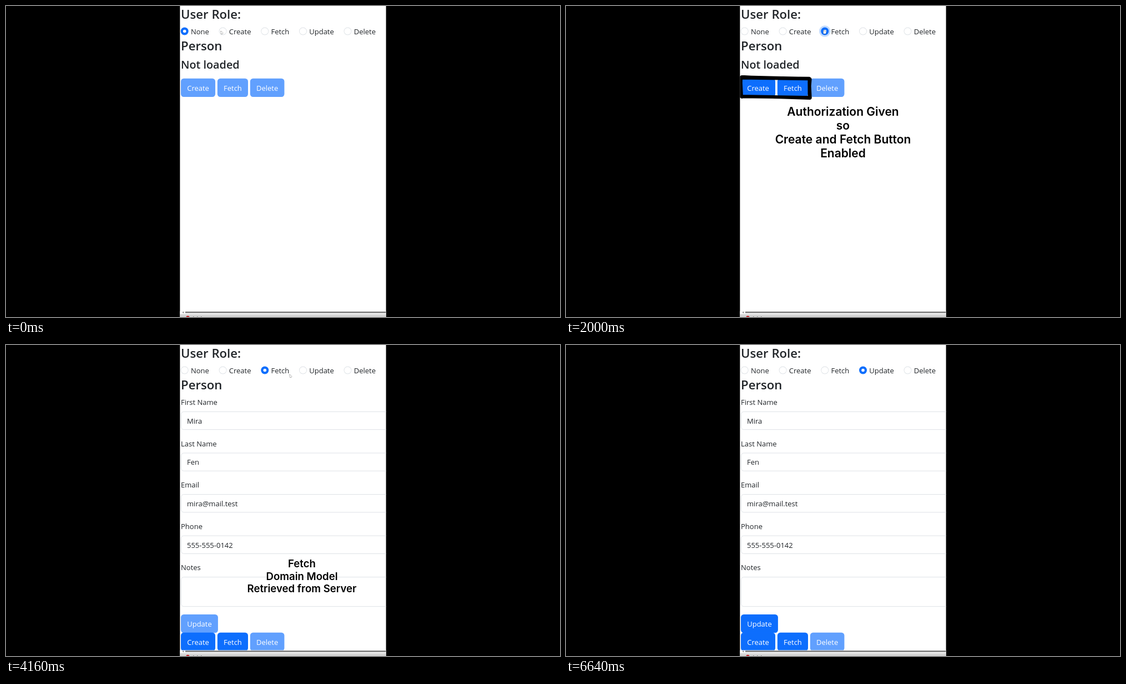
These frames come from a looping animation (998 by 561 pixels, 6.72 s). An HTML page with a canvas:

```html
<!DOCTYPE html>
<html lang="en">
<head>
<meta charset="utf-8">
<title>Role based form</title>
<style>
html, body { margin: 0; width: 100%; height: 100%; overflow: hidden; background: #000; }
canvas { display: block; }
</style>
</head>
<body>
<canvas id="stage" width="998" height="561"></canvas>
<script>
const ctx = document.getElementById('stage').getContext('2d');
const LOOP = 6720, STEP = 80;
const LOAD = 3200;                      // the form arrives
const CHECKS = [400, 1680, 4960];       // Create, Fetch, Update get checked
const LEFT = 315, RADIO_Y = 45.5, FIELD_STEP = 74.6;
const BLUE = '#0d6efd', HOVER = '#0b5ed7', INK = '#212529', LINE = '#dee2e6';
const UI = '"Open Sans", "Noto Sans", sans-serif';
const CAPTION = 'Inter, sans-serif';

const roles = ['None', 'Create', 'Fetch', 'Update', 'Delete'];
const fields = { 'First Name': 'Mira', 'Last Name': 'Fen', Email: 'mira@mail.test', Phone: '555-555-0142', Notes: '' };

const captions = [
  { from: 720, to: 1920, x: 490.5, y: 238, size: 21.8, lines: ['Authorization Given', 'so', 'Create Button Enabled'] },
  { from: 1920, to: LOAD, x: 499, y: 228.3, size: 21, lines: ['Authorization Given', 'so', 'Create and Fetch Button', 'Enabled'] },
  { from: 3360, to: 5200, x: 533, y: 417, size: 18.6, lines: ['Fetch', 'Domain Model', 'Retrieved from Server'] },
  { from: 5200, to: 6640, x: 541, y: 422.3, size: 22, lines: ['Update Authorization', 'Given'] }
];

// the pointer rests at each stop until the next move starts
const stops = [
  { start: 0, end: 0, x: 387, y: 45 },
  { start: 80, end: 240, x: 390, y: 43, hand: true },
  { start: 880, end: 1440, x: 465, y: 43, hand: true },
  { start: 2320, end: 2800, x: 421, y: 150, hand: true },
  { start: 3120, end: 3440, x: 461, y: 122 },
  { start: 3920, end: 4160, x: 511, y: 53 },
  { start: 4160, end: 4320, x: 534, y: 43, hand: true },
  { start: 5360, end: 5440, x: 593, y: 8 },
  { start: 5440, end: 5600, x: 640, y: -20 }
];

const within = (t, from, to) => t >= from && t < to;
const clamp = v => Math.max(0, Math.min(1, v));
// two-step colour transition of a button that becomes enabled
const enabledSince = (t, start) => clamp((t - start + STEP) / (2 * STEP));

// returns the width of the drawn text
function text(str, x, y, { size = 13, weight = 400, color = INK, align = 'left', family = UI } = {}) {
  ctx.font = `${weight} ${size}px ${family}`;
  ctx.fillStyle = color;
  ctx.textAlign = align;
  ctx.fillText(str, x, y);
  return ctx.measureText(str).width;
}

function heading(str, y, size = 22.2) {
  text(str, LEFT, y, { size, weight: 600 });
}

function rect(x, y, w, h, color) {
  ctx.fillStyle = color;
  ctx.fillRect(x, y, w, h);
}

function disc(x, y, r, color) {
  ctx.beginPath();
  ctx.arc(x, y, r, 0, 7);
  ctx.fillStyle = color;
  ctx.fill();
}

// returns the x where the next button starts
function button(label, x, y, enabled, color = BLUE) {
  ctx.font = `13px ${UI}`;
  const w = ctx.measureText(label).width + 22.4;
  ctx.globalAlpha = 0.65 + 0.35 * enabled;
  ctx.beginPath();
  ctx.roundRect(x, y, w, 33.2, 5.2);
  ctx.fillStyle = color;
  ctx.fill();
  ctx.globalAlpha = 1;
  text(label, x + w / 2, y + 22.1, { color: '#fff', align: 'center' });
  return x + w + 3.8;
}

function drawRadios(t) {
  const checked = CHECKS.filter(time => t >= time).length;
  const focused = within(t, 400, 1440) ? 1 : within(t, 1440, 2800) ? 2 : within(t, 4640, 6640) ? 3 : -1;
  let x = 321.7;
  roles.forEach((role, i) => {
    if (i === focused) disc(x, RADIO_Y, 10.3, '#c2dbfe');
    disc(x, RADIO_Y, 7, i === checked ? BLUE : LINE);
    disc(x, RADIO_Y, i === checked ? 2.8 : 6.1, '#fff');
    x += 36 + text(role, x + 11.2, RADIO_Y + 5.2);
  });
}

function drawForm(t) {
  Object.entries(fields).forEach(([label, value], i) => {
    const y = 120.3 + i * FIELD_STEP;
    text(label, LEFT, y - 12.3);
    ctx.beginPath();
    ctx.roundRect(LEFT + 0.4, y, 400, label === 'Notes' ? 53 : 32.3, 5);
    ctx.strokeStyle = LINE;
    ctx.lineWidth = 1;
    ctx.stroke();
    text(value, LEFT + 11, y + 21.4);
  });
  button('Update', LEFT, 486, enabledSince(t, CHECKS[2]));
}

// hand-drawn frame: every side is stroked a few times with seeded wobble
function sketchFrame(x, y, w, h, { width, passes, wobble, tilt = 0 }) {
  let seed = 7;
  const jitter = () => ((seed = seed * 16807 % 2147483647) / 2147483647 - 0.5) * 2 * wobble;
  const corners = [[x, y], [x + w, y + tilt], [x + w, y + h + tilt], [x, y + h]];
  ctx.strokeStyle = '#000';
  ctx.lineWidth = width;
  ctx.lineCap = 'round';
  ctx.beginPath();
  for (let i = 0; i < 4 * passes; i++) {
    const [x1, y1] = corners[i % 4], [x2, y2] = corners[(i + 1) % 4];
    ctx.moveTo(x1 + jitter(), y1 + jitter());
    ctx.lineTo(x2 + jitter(), y2 + jitter());
  }
  ctx.stroke();
}

function drawScrollbar() {
  rect(313, 550.5, 372, 5.5, '#f8f8f8');
  rect(323, 551.2, 362, 2.8, '#858585');
  ctx.beginPath();
  ctx.moveTo(317.5, 552.8);
  ctx.lineTo(320.3, 551);
  ctx.lineTo(320.3, 554.6);
  ctx.fill();
  rect(313, 556, 372, 5, '#d6d6d6');
  disc(327.5, 562, 3.2, '#c5282f');
  for (let x = 337; x < 352; x += 7) rect(x, 560, 1.5, 1, '#777');
}

function drawPointer(t) {
  const i = stops.findLastIndex(stop => t >= stop.start);
  const to = stops[i], from = stops[i - 1] || to;
  const k = to.end > to.start ? clamp((t - to.start) / (to.end - to.start)) : 1;
  ctx.save();
  ctx.translate(from.x + (to.x - from.x) * k, from.y + (to.y - from.y) * k);
  ctx.beginPath();
  if (to.hand && k === 1) {
    ctx.roundRect(-0.2, 0, 1.6, 5, 0.8);
    ctx.roundRect(-1.4, 2.6, 4.8, 4.4, 1.6);
  } else {
    ctx.moveTo(0, 0);
    ctx.lineTo(0.6, 5.4);
    ctx.lineTo(2.6, 5.6);
    ctx.lineTo(3.8, 3.5);
    ctx.closePath();
  }
  ctx.strokeStyle = '#444';
  ctx.lineWidth = 0.8;
  ctx.stroke();
  ctx.fillStyle = '#fff';
  ctx.fill();
  ctx.restore();
}

function drawCaption({ x, y, size, lines }) {
  const middle = (lines.length - 1) / 2;
  lines.forEach((line, i) => text(line, x, y + (i - middle) * size * 1.2 + size * 0.35,
    { size, weight: 600, color: '#000', align: 'center', family: CAPTION }));
}

function draw(t) {
  const loaded = t >= LOAD;
  rect(0, 0, 998, 561, '#000');
  ctx.save();
  ctx.beginPath();
  ctx.rect(313.4, 0, 371.2, 561);
  ctx.clip();
  rect(313, 0, 372, 561, '#fff');

  heading('User Role:', 22.7);
  drawRadios(t);
  heading('Person', 79.8);
  if (loaded) drawForm(t);
  else heading('Not loaded', 112.6, 19.8);

  const row = loaded ? 518.8 : 130.7;
  let x = button('Create', LEFT, row, enabledSince(t, CHECKS[0]));
  x = button('Fetch', x, row, enabledSince(t, CHECKS[1]), within(t, 2720, LOAD) ? HOVER : BLUE);
  button('Delete', x, row, 0);
  drawScrollbar();

  if (within(t, 720, 1920)) sketchFrame(323.7, 128.2, 47.6, 39, { width: 1.6, passes: 1, wobble: 0.9 });
  if (within(t, 1920, LOAD)) sketchFrame(315.5, 129, 123.5, 34.5, { width: 4.4, passes: 6, wobble: 1.7, tilt: 2 });
  captions.filter(({ from, to }) => within(t, from, to)).forEach(drawCaption);
  drawPointer(t);
  ctx.restore();
}

function tick() {
  draw(Math.floor(performance.now() % LOOP / STEP) * STEP);
  requestAnimationFrame(tick);
}
tick();
</script>
</body>
</html>
```
